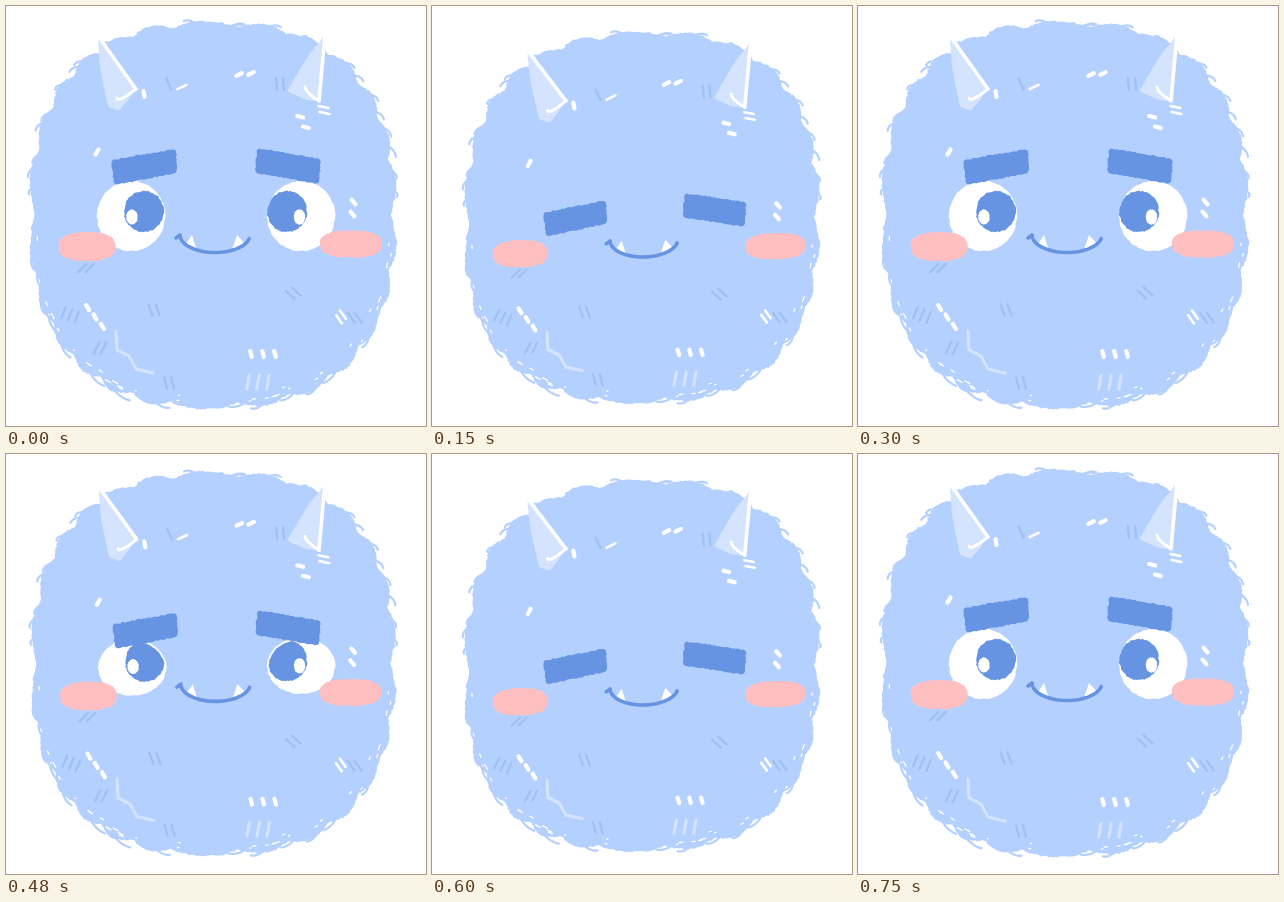
Recreate the animation shown at these times as an HTML page with a canvas. Size 420 px wide and 420 px high, loop 1.5 s.

```html
<!DOCTYPE html>
<html lang="en">
<head>
<meta charset="utf-8">
<title>Fluffy monster</title>
<style>
html, body { margin: 0; width: 100%; height: 100%; overflow: hidden; background: #fff; }
canvas { display: block; width: 100vw; height: 100vh; }
</style>
</head>
<body>
<canvas id="stage" width="420" height="420"></canvas>
<script>
const ctx = document.getElementById('stage').getContext('2d');
const FUR = '#b4d0ff', INK = '#6794e2', SHADE = '#9fbff5', PALE = '#d4e4ff', PINK = '#ffbfc1', WHITE = '#fff';
const LOOP = 1500, STEP = 30, STEPS = 10, TAU = Math.PI * 2;

let seed = 11;
function rnd() {
  seed = (seed * 16807) % 2147483647;
  return seed / 2147483647;
}
const spread = n => (rnd() - 0.5) * 2 * n;
const clamp = v => Math.max(0, Math.min(1, v));
const mix = (a, b, t) => [a[0] + (b[0] - a[0]) * t, a[1] + (b[1] - a[1]) * t];
const polar = (p, angle, d) => [p[0] + Math.cos(angle) * d, p[1] + Math.sin(angle) * d];
const times = (n, make) => Array.from({ length: n }, (_, i) => make(i));

let squash = 0;
// bends a resting point towards the squashed, tilted pose
function warp([x, y]) {
  const bulge = 1 - 0.55 * ((y - 220) / 190) ** 2;
  const dx = (9.8 - 0.0325 * x) * bulge;
  const dy = 16.7 - 0.031 * x - (1.37e-4 - 2e-7 * x) * y * y;
  return [x + dx * squash, y + dy * squash];
}

function trace(points, dy = 0) {
  ctx.beginPath();
  for (const p of points) {
    const [x, y] = warp(p);
    ctx.lineTo(x, y + dy);
  }
}

function fill(points, color, dy) {
  trace(points, dy);
  ctx.fillStyle = color;
  ctx.fill();
}

function line(points, color, width) {
  trace(points);
  ctx.strokeStyle = color;
  ctx.lineWidth = width;
  ctx.stroke();
}

const quad = (a, c, b, n = 8) => times(n, i => {
  const t = i / (n - 1);
  return mix(mix(a, c, t), mix(c, b, t), t);
});

// point on an oval; a power above 2 squares it off
function onOval(cx, cy, rx, ry, power, a) {
  const part = v => Math.sign(v) * Math.abs(v) ** (2 / power);
  return [cx + rx * part(Math.cos(a)), cy + ry * part(Math.sin(a))];
}

const oval = (cx, cy, rx, ry, power = 2, rough = 0.4) => times(72, i => {
  const [x, y] = onOval(cx, cy, rx, ry, power, i * TAU / 72);
  return [x + spread(rough), y + spread(rough)];
});

// polygon with rounded corners and a crayon edge
function softPoly(corners, round, rough) {
  return corners.flatMap((p, i) => {
    const n = corners.length, prev = corners[(i + n - 1) % n], next = corners[(i + 1) % n];
    const len = q => Math.hypot(q[0] - p[0], q[1] - p[1]);
    const far = len(next);
    const side = times(Math.max(0, Math.floor((far - 2 * round) / 2)), k => {
      const [x, y] = mix(p, next, (round + 2 * k) / far);
      return [x + spread(rough), y + spread(rough)];
    });
    return [...quad(mix(p, prev, round / len(prev)), p, mix(p, next, round / far)), ...side];
  });
}

// body: a squarish oval with a scalloped rim
const MID = [207, 209], LOBES = 26, RIM = 900;
const rimPoint = a => {
  const lobe = Math.abs(Math.sin(a * LOBES / 2 + 0.5 * Math.sin(3 * a)));
  return mix(MID, onOval(...MID, 184, 194, 2.5, a), 0.97 + 0.03 * lobe);
};
const outline = times(RIM, i => {
  const [x, y] = rimPoint(i * TAU / RIM);
  return [x + spread(0.7), y + spread(0.7)];
});

// hairs sweep down along the rim, longer below
const hairs = times(54, i => {
  const p = rimPoint((i + rnd()) * TAU / 54);
  const out = Math.atan2(p[1] - MID[1], p[0] - MID[0]);
  const low = p[1] > 230;
  const turn = out + Math.sign(p[0] - MID[0]) * (low ? 1.5 : 1.35);
  const a = polar(p, out, -1), b = polar(a, turn, (low ? 9 : 5) + rnd() * 9);
  return quad(a, polar(mix(a, b, 0.5), out, 3), b);
});

// white slits just inside the lower rim
const slits = times(34, () => {
  const a = rnd() * Math.PI, p = mix(MID, rimPoint(a), 0.955 + rnd() * 0.03);
  return [p, polar(p, a + Math.PI / 2, 1 + rnd() * 5)];
});

// n parallel strokes around (x, y), leaning one way and lined up along another, in degrees
function tuft({ color, width, len, gap }, x, y, n, lean, run = 0) {
  const strokes = times(n, i => {
    const p = polar([x, y], run * TAU / 360, (i - (n - 1) / 2) * gap);
    return [-0.5, 0.5].map(k => polar(p, lean * TAU / 360, k * len));
  });
  return () => strokes.forEach(s => line(s, color, width));
}

const dab = { color: WHITE, width: 4.2, len: 6, gap: 12 };
const tick = { color: WHITE, width: 2.6, len: 10, gap: 6 };
const hair = { color: SHADE, width: 2.2, len: 12, gap: 7 };
const glow = { color: PALE, width: 3, len: 14, gap: 10 };
const tufts = [
  tuft(hair, 163, 78, 1, 65),
  tuft(hair, 274, 78, 2, 85),
  tuft(hair, 80, 262, 2, -45),
  tuft(hair, 64, 309, 3, -68, 20),
  tuft(hair, 148, 304, 2, 70),
  tuft(hair, 287, 287, 2, 42, -30),
  tuft(hair, 349, 312, 2, 55),
  tuft(hair, 163, 377, 2, 75),
  tuft(hair, 94, 342, 2, -65),
  tuft(glow, 252, 376, 3, 100),
  tuft(tick, 318, 104, 2, 12, 80),
  tuft(tick, 335, 311, 2, 55, 130),
  tuft(tick, 176, 81, 1, -25),
  tuft(dab, 138, 88, 1, 80),
  tuft(dab, 91, 146, 1, -60),
  tuft(dab, 239, 68, 2, -25, -5),
  tuft(dab, 297, 116, 2, 15, 62),
  tuft(dab, 347, 202, 2, 50, 95),
  tuft(dab, 89, 311, 3, 60, 52),
  tuft(dab, 257, 348, 3, 75)
];
const crease = [[110, 325], [111, 344], [123, 350], [130, 363], [147, 367]];

function horn(tip, edge, foot, outer, notch) {
  const side = mix(mix(tip, outer, 0.4), edge, -0.08);
  const shape = [tip, ...softPoly([side, tip, edge, foot, outer], 3, 0.4)];
  const ring = quad(notch, mix(notch, foot, 0.4), edge);
  return () => {
    fill(shape, PALE);
    line([tip, edge], WHITE, 3.6);
    line(ring, WHITE, 3);
  };
}
const horns = [
  horn([92, 30], [130, 83], [113, 105], [102, 101], [111, 92]),
  horn([319, 29], [313, 95], [300, 94], [281, 85], [299, 81])
];

const brow = (drop, ...corners) => ({ drop, shape: softPoly(corners, 4, 0.7) });
const brows = [
  brow(42, [105, 154], [170, 143], [171, 167], [108, 179]),
  brow(38, [251, 142], [315, 153], [313, 178], [249, 167])
];
const cheeks = [oval(81, 240.5, 28.5, 14.5, 2.5), oval(345, 238, 31, 13.5, 2.6)];
const smile = [[170, 232], ...times(30, i => onOval(209, 229, 35, 17.5, 2, Math.PI * (1 - i / 31)))];
const teeth = [[[180, 238], [186, 229], [190, 242]], [[226, 244], [231, 229], [240, 239]]];

const eye = (x, drop, px, gx) => ({
  x, drop, y: 210, pupil: oval(px, 205.5, 20, 20.5, 2, 0.7), glint: oval(gx, 211, 5.8, 7.5)
});
const eyes = [eye(125, 10, 138, 126), eye(295, 5, 281, 293.5)];
const lidEdge = oval(0, 0, 1, 1, 2, 0.015);

function drawEye({ x, y, drop, pupil, glint }) {
  const open = 35 * (1 - squash);
  if (open < 1) return;
  const [cx, top] = warp([x, y]), cy = top + drop * squash;
  const lid = inset => {
    ctx.beginPath();
    for (const [u, v] of lidEdge) ctx.lineTo(cx + u * (34 - inset), cy + v * Math.max(0, open - inset));
  };
  const inside = (inset, shape, color, dy) => {
    ctx.save();
    lid(inset);
    ctx.clip();
    fill(shape, color, dy);
    ctx.restore();
  };
  lid(0);
  ctx.fillStyle = WHITE;
  ctx.fill();
  inside(9 * squash, pupil, INK, 2 * squash);
  inside(0, glint, WHITE, 0);
}

function draw(step) {
  squash = 1 - Math.abs(step - 5) / 5;
  // brows fall fast, hold, then lift ahead of the lids
  const frown = Math.min(clamp(step / 3), clamp((7.5 - step) / 2.5));
  ctx.fillStyle = WHITE;
  ctx.fillRect(0, 0, 420, 420);
  ctx.lineCap = ctx.lineJoin = 'round';

  fill(outline, FUR);
  slits.forEach(s => line(s, WHITE, 1.3));
  hairs.forEach(h => line(h, FUR, 2.2));
  horns.forEach(paint => paint());
  tufts.forEach(paint => paint());
  line(crease, PALE, 3);
  eyes.forEach(drawEye);
  cheeks.forEach(c => fill(c, PINK));
  teeth.forEach(t => fill(t, WHITE));
  line(smile, INK, 3.6);
  brows.forEach(b => fill(b.shape, INK, b.drop * frown));
}

// two blinks, starting at 0 and 450 ms, then a rest
function stepAt(t) {
  const start = t < 450 ? 0 : 450;
  return Math.min(STEPS, Math.floor((t - start) / STEP));
}

function play(now) {
  draw(stepAt(now % LOOP));
  requestAnimationFrame(play);
}

draw(0);
requestAnimationFrame(play);
</script>
</body>
</html>
```
